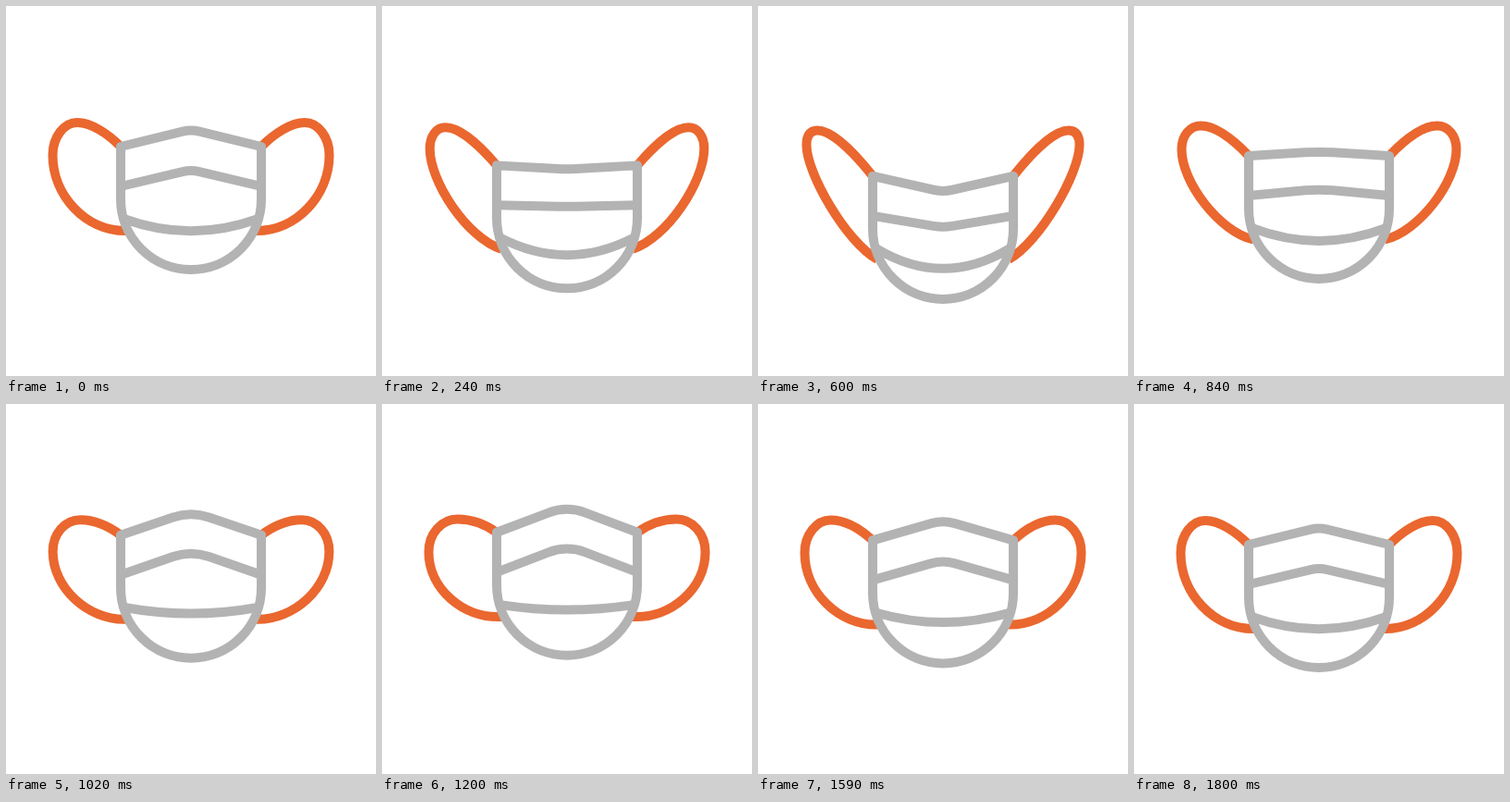
Animation, 400 px wide and 400 px high, one loop 1830 ms. Source, as an HTML page:

```html
<!DOCTYPE html>
<html lang="en">
<head>
<meta charset="utf-8">
<title>Face mask</title>
<style>
  html, body { margin: 0; width: 100%; height: 100%; overflow: hidden; background: #fff; }
  svg { display: block; width: 100vw; height: 100vh; }
  path { fill: none; stroke-width: 10; stroke-linejoin: round; }
  .ear { stroke: #ea672f; }
  .mask { stroke: #b3b3b3; stroke-linecap: round; }
</style>
</head>
<body>
<svg viewBox="0 0 400 400">
  <path class="ear" id="left"/>
  <path class="ear" id="right" transform="matrix(-1 0 0 1 400 0)"/>
  <path class="mask" id="shell"/>
  <path class="mask" id="fold"/>
  <path class="mask" id="hem"/>
</svg>
<script>
const LOOP = 1830, STEP = 30;

// side: y of the upper corners; rise, foldRise: height of the peaks; round: half width of a peak;
// sag: depth of the lowest seam; ear: control points from the corner to the lower end
const rest = {
  side: 152, rise: 17.5, foldRise: 17, round: 9, sag: 13,
  ear: [124, 152, 110, 138, 92, 126, 77, 126, 62.5, 126, 50.5, 142, 50.5, 161, 50.5, 205, 86, 243, 129, 243]
};
const low = {
  side: 185, rise: -17, foldRise: -12.8, round: 10, sag: 22,
  ear: [124, 185, 110, 167, 82, 134.7, 63.5, 134.7, 56, 134.7, 52.5, 140, 52.5, 150, 52.5, 180, 95, 255, 129, 275]
};
const high = {
  side: 138.8, rise: 25, foldRise: 25.3, round: 20, sag: 5.5,
  ear: [124, 138.8, 113, 131, 98, 124.5, 81.5, 124.5, 64.5, 124.5, 50.5, 140, 50.5, 160, 50.5, 200, 88, 232, 129, 230]
};

// start, end, poses, horizontal handles of the easing curve
const moves = [
  [0, 480, rest, low, 0.65, 0.25],
  [480, 1200, low, high, 0.7, 0.3],
  [1200, 1800, high, rest, 0.6, 0.6]
];

function ease(x, x1, x2) {
  let a = 0, b = 1;
  for (let i = 0; i < 24; i++) {
    const t = (a + b) / 2, u = 1 - t;
    if (3 * u * u * t * x1 + 3 * u * t * t * x2 + t * t * t < x) a = t;
    else b = t;
  }
  return a * a * (3 - 2 * a);
}

const mix = (a, b, k) => a + (b - a) * k;

function poseAt(time) {
  const [start, end, from, to, x1, x2] = moves.find(m => time < m[1]) || moves[2];
  const k = ease(Math.min(1, (time - start) / (end - start)), x1, x2);
  const pose = {};
  for (const key in from) {
    pose[key] = key === 'ear'
      ? from.ear.map((v, i) => mix(v, to.ear[i], k))
      : mix(from[key], to[key], k);
  }
  return pose;
}

// Straight slopes meeting in a rounded peak
function ridge(y, rise, round) {
  const slope = rise / (76 - round / 2);
  const shoulder = y - slope * (76 - round);
  return `M124 ${y}L${200 - round} ${shoulder}Q200 ${y - slope * 76} ${200 + round} ${shoulder}L276 ${y}`;
}

const draw = (id, d) => document.getElementById(id).setAttribute('d', d);

function render(time) {
  const { side, rise, foldRise, round, sag, ear } = poseAt(time);
  const loop = `M${ear.slice(0, 2)}C${ear.slice(2)}`;
  const seam = side + 78.3;
  draw('left', loop);
  draw('right', loop);
  draw('shell', `${ridge(side, rise, round)}V${side + 57}A76 76 0 0 1 124 ${side + 57}Z`);
  draw('fold', ridge(side + 43, foldRise, round));
  draw('hem', `M128 ${seam}Q200 ${seam + 2 * sag} 272 ${seam}`);
}

const begin = performance.now();
function tick() {
  const time = (performance.now() - begin) % LOOP;
  render(Math.floor(time / STEP) * STEP);
  requestAnimationFrame(tick);
}
tick();
</script>
</body>
</html>
```
